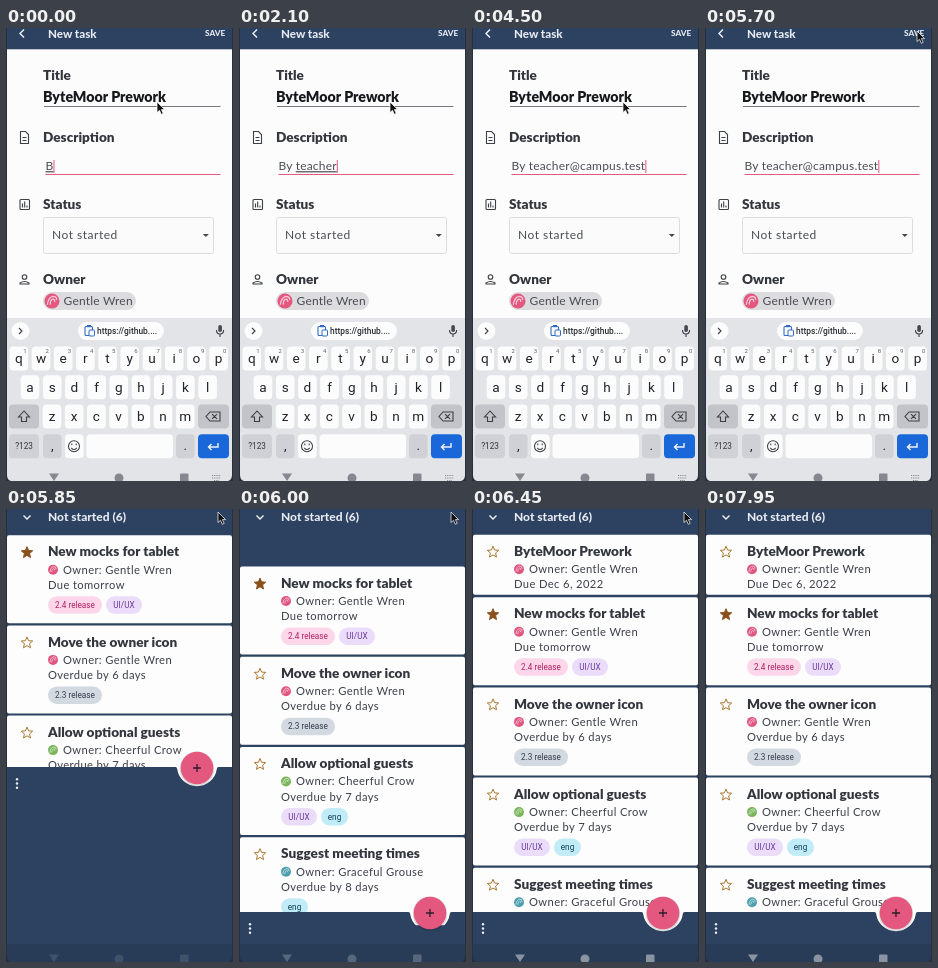
Recreate the animation shown at these times as an HTML page. Size 227 by 453 pixels, loop 8000 ms.

```html
<!DOCTYPE html>
<html lang="en">
<head>
<meta charset="utf-8">
<title>New task</title>
<style>
  html, body { margin: 0; height: 100%; overflow: hidden; background: #2d4260; }
  svg { display: block; width: 100vw; height: 100vh; }
  text { font-family: Lato, sans-serif; white-space: pre; }
  .head { font-weight: 900; font-size: 13.6px; fill: #34363e; }
  .value { font-weight: 900; font-size: 14.2px; fill: #17181c; }
  .body { font-size: 12px; letter-spacing: .2px; fill: #4b4d53; }
  .wide { letter-spacing: .5px; }
  .line { font-size: 11.2px; letter-spacing: .38px; fill: #3c3f47; }
  .bar { font-weight: 800; font-size: 12px; fill: #e6eaf2; }
  .tag, .key, .small { font-family: Roboto, sans-serif; }
  .tag { font-size: 8.2px; }
  .key { font-size: 13.6px; fill: #202328; text-anchor: middle; }
  .small { font-size: 6px; fill: #5a5f68; text-anchor: middle; }
  .icon { fill: none; stroke: #3c3f45; stroke-width: 1.1; }
  .pale { fill: none; stroke: #f1f4f9; stroke-width: 1.4; }
</style>
</head>
<body>
<svg id="stage" viewBox="0 0 227 453" preserveAspectRatio="none"></svg>
<script>
const LOOP = 8000;
const NAVY = '#2d4260', PINK = '#e4577f';
const text = (cls, x, y, s, extra = '') => `<text class="${cls}" x="${x}" y="${y}" ${extra}>${s}</text>`;
const rect = (x, y, w, h, r, fill, extra = '') =>
  `<rect x="${x}" y="${y}" width="${w}" height="${h}" rx="${r}" fill="${fill}" ${extra}/>`;
const circle = (x, y, r, fill) => `<circle cx="${x}" cy="${y}" r="${r}" fill="${fill}"/>`;
const path = (d, cls, extra = '') => `<path d="${d}" class="${cls}" ${extra}/>`;

const avatar = (x, y, r, color) => `<g transform="translate(${x} ${y}) scale(${r / 8})">${circle(0, 0, 8, color)}
  <path d="M-5 4Q-4-4 1-5Q5-5 5-1M-2 4Q-2-1 1-2Q3-2 3 1" fill="none" stroke="#fff" stroke-opacity=".7" stroke-width="1.3"/></g>`;

function navIcons(color) {
  return `<g fill="${color}"><path d="M43 445.500H53L48 453Z"/>${circle(113, 450, 4.500, color)}${rect(174, 445.500, 8.500, 9, 1, color)}</g>`;
}

function formScreen() {
  return rect(0, 0, 227, 453, 0, '#fcfcfd') + rect(0, 0, 227, 21.3, 0, NAVY) +
    path('M18 1.500L14 5.500L18 9.500', 'pale') +
    text('bar', 42, 9.7, 'New task', 'style="font-size:11.600px"') +
    text('bar', 199, 8.3, 'SAVE', 'style="font-size:8.200px"') +
    text('head', 37, 51.5, 'Title') + text('value', 37, 73.5, 'ByteMoor Prework') +
    rect(38, 78, 176.5, 1, 0, '#77797e') +
    path('M14.500 103.500H19.500L22.500 106.500V115.500H14.500ZM16.500 109.500H20.500M16.500 112.500H20.500', 'icon') +
    text('head', 37, 113.8, 'Description') +
    text('body', 39.5, 142.2, '<tspan id="done"></tspan><tspan id="word" text-decoration="underline"></tspan><tspan id="rest"></tspan>', 'id="typed"') +
    rect(39.5, 146, 175, 1, 0, PINK) +
    `<rect id="caret" y="132" width="1" height="13" fill="${PINK}"/>` +
    rect(14, 171.5, 9.5, 10, 1, 'none', 'class="icon"') + path('M16.500 179.500V175.500M18.700 179.500V173.500M21 179.500V177.500', 'icon') +
    text('head', 37, 181, 'Status') +
    rect(37.5, 189.5, 170, 36, 2, '#fbfbfc', 'stroke="#dcdde0"') + text('body wide', 46, 211.2, 'Not started') +
    '<path d="M196.800 206H202.800L199.800 209Z" fill="#44464b"/>' +
    '<circle cx="18.500" cy="249" r="2.300" class="icon"/>' + path('M14 256V255Q18.500 252 23 255V256Z', 'icon') +
    text('head', 37, 256, 'Owner') +
    rect(37, 264, 93, 18, 9, '#dcdcde') + avatar(46, 273, 7.5, PINK) + text('body', 57.5, 277, 'Gentle Wren') +
    keyboard();
}

function keyboard() {
  const dark = '#c3c4c9', mid = '#d0d1d6';
  const cap = (x, y, w, fill = '#fcfcfd') => rect(x, y, w, 24, 4, fill);
  const row = (chars, x0, y) => [...chars].map((c, i) => {
    const x = x0 + i * 22.2;
    return cap(x - 9.3, y - 12, 18.6) + text('key', x, y + 4.5, c);
  }).join('');
  const hints = [...'1234567890'].map((n, i) => text('small', 19 + i * 22.2, 325, n)).join('');
  return rect(0, 290, 227, 163, 0, '#e3e4e8') +
    circle(14.5, 303, 9, '#fcfcfd') + path('M13 300L16 303L13 306', 'icon') +
    rect(72, 294, 86, 18, 9, '#fcfcfd') +
    rect(79, 298.5, 7.5, 9, 1, 'none', 'class="icon" style="stroke:#2f6bc4"') + rect(81, 297, 4, 2.2, 0, '#2f6bc4') +
    rect(83, 302, 5.5, 6, 1, '#fcfcfd', 'stroke="#2f6bc4"') +
    text('tag', 91, 306.3, 'https://github....', 'font-weight="500" fill="#2a2d33" style="font-size:8.400px"') +
    rect(212.3, 297, 3.6, 7, 1.8, '#44484f') + path('M210.500 302Q210.500 306 214 306Q217.600 306 217.600 302M214 306V309', 'icon') +
    row('qwertyuiop', 12.8, 330.5) + hints + row('asdfghjkl', 24, 359.3) + row('zxcvbnm', 46, 388.5) +
    cap(3, 376.5, 30, dark) + path('M18 383L12.500 389H15.500V393.500H20.500V389H23.500Z', 'icon') +
    cap(192, 376.5, 31, dark) + path('M204 384H214V393H204L200 388.500ZM206 386.200L211 390.800M211 386.200L206 390.800', 'icon') +
    cap(3, 406.3, 30, mid) + text('tag', 18, 421.3, '?123', 'text-anchor="middle" fill="#30343b"') +
    cap(37, 406.3, 18.6, mid) + text('key', 46.3, 422, ',') +
    cap(59, 406.3, 18.6) + '<circle cx="68" cy="418.300" r="5.500" class="icon"/>' +
    path('M65.300 419.800Q68 423.300 70.700 419.800M65.800 415.600V417.300M70.200 415.600V417.300', 'icon') +
    cap(80.5, 406.3, 86.5) + cap(170, 406.3, 18.6, mid) + text('key', 179.3, 422, '.') +
    cap(192, 406.3, 31, '#1967d9') + path('M212 415V419H202.500M205.500 416L202.500 419L205.500 422', 'pale') +
    navIcons('#85888f') +
    path('M206 447.500H215M206 450H215M208 452.500H213', 'icon', 'stroke-dasharray="1.200 1" style="stroke:#888"');
}

const TAGS = {
  '2.4 release': [54, '#fcd7e9', '#b01f60'],
  '2.3 release': [54, '#d3d9e1', '#333d4c'],
  'UI/UX': [36, '#ebdcfa', '#6a3a9c'],
  'eng': [27, '#c0ebf7', '#0d4254']
};

function star(filled) {
  const points = Array.from({ length: 10 }, (_, i) => {
    const r = i % 2 ? 2.7 : 6, a = Math.PI * (i / 5 - .5);
    return `${(21 + r * Math.cos(a)).toFixed(1)},${(17.5 + r * Math.sin(a)).toFixed(1)}`;
  });
  return `<polygon points="${points.join(' ')}" fill="${filled ? '#8a501c' : 'none'}" stroke="${filled ? '#8a501c' : '#a9772f'}"/>`;
}

function card(y, title, owner, color, due, tags = [], starred = false) {
  let x = 42;
  const chips = tags.map(name => {
    const [w, bg, fg] = TAGS[name];
    const chip = rect(x, 61, w, 17.5, 8.75, bg) +
      text('tag', x + w / 2, 72.7, name, `text-anchor="middle" fill="${fg}"`);
    x += w + 4;
    return chip;
  }).join('');
  return `<g transform="translate(0 ${y})">${rect(1, 0, 225, tags.length ? 88 : 60, 2, '#fdfdfe')}${star(starred)}` +
    text('head', 42, 21.3, title) + avatar(47, 34.5, 5, color) + text('line', 57, 38.5, 'Owner: ' + owner) +
    text('line', 42, 53.7, due) + chips + '</g>';
}

function listScreen() {
  const wren = ['Gentle Wren', '#e0557f'];
  return rect(0, 0, 227, 453, 0, NAVY) +
    `<g id="added">${card(25.7, 'ByteMoor Prework', ...wren, 'Due Dec 6, 2022')}</g><g id="cards">` +
    card(88.2, 'New mocks for tablet', ...wren, 'Due tomorrow', ['2.4 release', 'UI/UX'], true) +
    card(178.4, 'Move the owner icon', ...wren, 'Overdue by 6 days', ['2.3 release']) +
    card(268.6, 'Allow optional guests', 'Cheerful Crow', '#79b55b', 'Overdue by 7 days', ['UI/UX', 'eng']) +
    card(358.8, 'Suggest meeting times', 'Graceful Grouse', '#4d9fb0', 'Overdue by 8 days', ['eng']) + '</g>' +
    rect(0, 0, 227, 25, 0, NAVY) + path('M17.500 6.500L21 10L24.500 6.500', 'pale') + text('bar', 42, 11.8, 'Not started (6)') +
    '<g id="dock">' +
    `<path d="M0 0H169.500Q171 0 171.200 2A20 20 0 0 0 210.800 2Q211 0 212.500 0H227V200H0Z" fill="${NAVY}"/>` +
    [-4.3, 0, 4.3].map(d => circle(11, 16.5 + d, 1.2, '#eef1f6')).join('') +
    circle(191, 1.8, 17.3, '#0002') + circle(191, 1, 16.3, PINK) +
    path('M187 1H195M191-3V5', 'icon', 'style="stroke:#2b1c2c;stroke-width:1.300"') + '</g>' +
    rect(0, 435, 227, 18, 0, '#283b57') + `<g id="nav">${navIcons('#8a93a2')}</g>`;
}

const stage = document.getElementById('stage');
stage.innerHTML = `<g id="form">${formScreen()}</g><g id="list">${listScreen()}</g>` +
  '<path d="M0 0H1V447Q1 452 5 453H0ZM227 0H226V447Q226 452 222 453H227Z" fill="#26303f"/>' +
  '<path id="pointer" d="M0 0V10.500L2.500 8.300L4.300 12.300L6.200 11.400L4.400 7.600H7.600Z" fill="#111" stroke="#fff" stroke-width=".7"/>';
const el = id => document.getElementById(id);
const show = (id, on) => { el(id).style.display = on ? '' : 'none'; };
const progress = (t, from, to) => Math.min(1, Math.max(0, (t - from) / (to - from)));
const ease = p => (1 - Math.cos(Math.PI * p)) / 2;

const MESSAGE = 'By teacher@campus.test';
const KEY_TIMES = [0, 300, 600, 1050, 1200, 1500, 1650, 1800, 1950, 2100, 2400, 2850,
  3150, 3300, 3450, 3600, 3900, 4050, 4200, 4350, 4500, 4500];

function drawTyping(t) {
  const typed = MESSAGE.slice(0, KEY_TIMES.filter(k => k <= t).length);
  let from = 0, to = 0;
  if (t < 600) to = typed.length;
  else if (t < 2850) { from = 3; to = Math.min(10, typed.length); }
  el('done').textContent = typed.slice(0, from);
  el('word').textContent = typed.slice(from, to);
  el('rest').textContent = typed.slice(to);
  el('caret').setAttribute('x', 39.5 + el('typed').getComputedTextLength());
}

function render(t) {
  const listed = t >= 5850;
  show('form', !listed);
  show('list', listed);
  if (listed) {
    const lift = -62 * (1 - ease(progress(t, 5870, 6130)));
    el('cards').setAttribute('transform', `translate(0 ${lift})`);
    el('dock').setAttribute('transform', `translate(0 ${t < 6000 ? 258 : 403})`);
    el('added').setAttribute('opacity', progress(t, 6170, 6400));
    el('nav').setAttribute('opacity', .25 + .75 * progress(t, 5850, 6300));
  } else {
    drawTyping(t);
  }
  const move = ease(progress(t, 4850, 5700));
  el('pointer').setAttribute('transform', `translate(${151 + 61 * move} ${74 - 71 * move})`);
  show('pointer', t < 7800);
}

function tick() {
  render(performance.now() % LOOP);
  requestAnimationFrame(tick);
}
tick();
</script>
</body>
</html>
```
